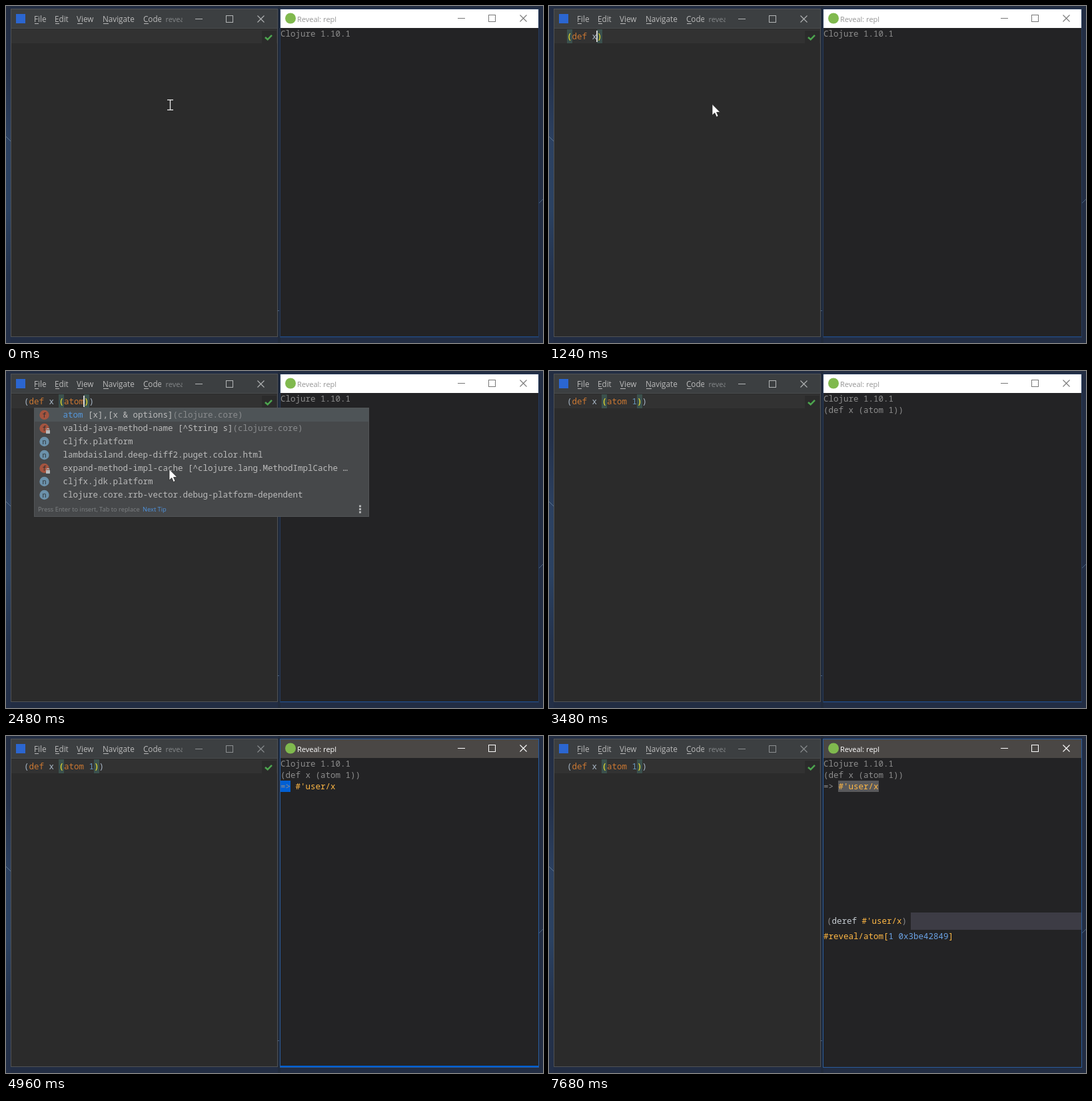
An HTML page with a canvas for the animation above (8 s loop, 806x506 px).

```html
<!DOCTYPE html>
<html lang="en">
<head>
<meta charset="utf-8">
<title>Editor and REPL</title>
<style>
html, body { margin: 0; width: 100%; height: 100%; overflow: hidden; background: #232e43; }
canvas { display: block; }
</style>
</head>
<body>
<canvas id="stage" width="806" height="506"></canvas>
<script>
const c = document.getElementById('stage').getContext('2d');
const LOOP = 8000, CW = 7.5;
const MONO = '"Noto Sans Mono", "DejaVu Sans Mono", monospace';
const UI = '"Open Sans", "Noto Sans", sans-serif';
const ORANGE = '#ffb845', GREY = '#8d8d8d', BLUE = '#005fd3', PANEL = '#3d3c45', DARK = '#232325';

const box = (x, y, w, h, col) => { c.fillStyle = col; c.fillRect(x, y, w, h); };
const frame = (x, y, w, h, col) => { c.strokeStyle = col; c.lineWidth = 1; c.strokeRect(x + .5, y + .5, w - 1, h - 1); };
const disc = (x, y, r, col) => { c.fillStyle = col; c.beginPath(); c.arc(x, y, r, 0, 7); c.fill(); };
const text = (s, x, y, col, size = 12.5, font = MONO) => {
  c.font = size + 'px ' + font;
  c.fillStyle = col;
  c.fillText(s, x, y);
};
const ui = (s, x, y, col, size = 11.2) => text(s, x, y, col, size, UI);
const line = (col, width, ...pts) => {
  c.strokeStyle = col; c.lineWidth = width; c.beginPath();
  for (let i = 0; i < pts.length; i += 2) c.lineTo(pts[i], pts[i + 1]);
  c.stroke();
};
const shape = (col, ...pts) => {
  c.fillStyle = col; c.beginPath();
  for (let i = 0; i < pts.length; i += 2) c.lineTo(pts[i], pts[i + 1]);
  c.closePath(); c.fill();
};
// [string, colour] runs on the character grid
const runs = (parts, x, y) => parts.forEach(([s, col]) => { text(s, x, y, col); x += s.length * CW; });
const rows = (s, x, y, step, col, size, font = UI) =>
  s.split('|').forEach((r, i) => text(r, x, y + i * step, col, size, font));
const clip = (x, y, w, h, draw) => {
  c.save(); c.beginPath(); c.rect(x, y, w, h); c.clip(); draw(); c.restore();
};
const shadowed = draw => {
  c.save(); c.shadowColor = 'rgba(0,0,0,.6)'; c.shadowBlur = 8; c.shadowOffsetY = 3; draw(); c.restore();
};

const KEYS = [[360, '('], [600, 'd'], [760, 'e'], [840, 'f'], [920, ' '], [1160, 'x'], [1640, ' '], [1840, '('],
  [2080, 'a'], [2240, 't'], [2320, 'o'], [2400, 'm'], [2640, ' '], [2800, '1']];
const QUERY = [[6520, 'd'], [6600, 'e'], [6840, 'r'], [6920, 'e']];
const ACTIONS = ['datafy', 'deref', 'doc', 'java-bean', 'meta', 'source', 'watch:all', 'watch:latest'];
const typed = (keys, t) => keys.filter(k => t >= k[0]).map(k => k[1]).join('');

// first letter: f function, F private function, n namespace
const DEF = ['fdef(clojure.core)', 'fdefn(clojure.core)', 'fdefn-(clojure.core)', 'fdefmulti(clojure.core)',
  'fdefmethod(clojure.core)', 'fdefmacro(clojure.core)', 'fdefonce(clojure.core)', 'fdefprotocol(clojure.core)',
  'fdefrecord(clojure.core)', 'fdeftype(clojure.core)', 'fdefstruct(clojure.core)', 'fdefinline(clojure.core)'];
const XS = ['fxml-seq [root](clojure.core)', 'nclojure.xml', 'fmax [x],[x y],[x y & more](clojure.core)',
  'fex-data [ex](clojure.core)', 'fex-info [msg map](clojure.core)', 'fnext [coll](clojure.core)',
  'fextend [atype & proto+mmaps](clojure.core)', 'findexed? [coll](clojure.core)', 'fex-cause [ex](clojure.core)',
  'fex-message [ex](clojure.core)', 'fnnext [x](clojure.core)', 'fexpt'];
const AS = ['fatom [x],[x & options](clojure.core)', 'fand [],[x],[x & next](clojure.core)',
  'fapply [f args],[f x args](clojure.core)', 'fassoc [map key val](clojure.core)',
  'fas-> [expr name & forms](clojure.core)', 'falter [ref fun & args](clojure.core)',
  'fagent [state & options](clojure.core)', 'faget [array idx](clojure.core)', 'falias [alias ns](clojure.core)',
  'fancestors [tag],[h tag](clojure.core)', 'faclone [array](clojure.core)', 'falength [array](clojure.core)'];
const ATOM = [AS[0], 'Fvalid-java-method-name [^String s](clojure.core)', 'ncljfx.platform',
  'nlambdaisland.deep-diff2.puget.color.html', 'Fexpand-method-impl-cache [^clojure.lang.MethodImplCache …',
  'ncljfx.jdk.platform', 'nclojure.core.rrb-vector.debug-platform-dependent'];
// from, to, index of the completed word, entries, height
const HINTS = [[680, 920, 1, DEF, 254], [1320, 1640, 5, XS, 254], [2160, 2480, 8, AS, 254], [2480, 2640, 8, ATOM, 164]];

function desktop() {
  const g = c.createLinearGradient(0, 0, 0, 506);
  ['#232d42', '#24314a', '#2c4161', '#2b4262', '#24334d', '#232f47'].forEach((col, i) => g.addColorStop(i / 5, col));
  box(0, 0, 806, 506, '#222d43');
  c.fillStyle = g; c.fillRect(0, 0, 7, 506);
  box(408, 0, 4, 506, '#202a3b');
  line('#5b7590', 1, 0, 196, 7, 203);
  line('#49617f', 1, 800, 296, 806, 290);
  box(408, 457, 2, 1, '#4a6384');
}

function controls(x, y, col) {
  line(col, 1, x - 5, y + .5, x + 6, y + .5);
  frame(x + 41, y - 5, 11, 11, col);
  line(col, 1.1, x + 88.5, y - 4.5, x + 98.5, y + 5.5);
  line(col, 1.1, x + 98.5, y - 4.5, x + 88.5, y + 5.5);
}

function editor(t, active) {
  box(7, 4, 401, 493, '#505254');
  box(8, 5, 399, 491, '#2b2b2b');
  box(8, 5, 399, 29, '#3c3f41');
  box(8, 33, 399, 1, '#494c4e');
  box(8, 35, 399, 21, '#323232');
  box(384, 37, 22, 19, '#2b2b2b');
  line('#4da54f', 2.6, 389, 47, 392.7, 50.3, 399, 43.8);
  box(15, 12, 14, 14, '#2b66d0');
  clip(8, 5, 225, 28, () => {
    const at = [42, 73, 106, 145, 206], under = [6, 6, 8, 8, 7];
    'File|Edit|View|Navigate|Code'.split('|').forEach((s, i) => {
      ui(s, at[i], 24, '#bbbbbb', 11.7);
      box(at[i] + 1, 26, under[i], 1, '#bbbbbb');
    });
  });
  clip(239, 5, 26, 28, () => ui('reveal', 239.5, 24, '#85888a', 11));
  controls(289, 19, active ? '#b4b6b7' : '#8c8f91');

  const head = typed(KEYS, t), opens = head.split('(').length - 1;
  const code = head + ')'.repeat(opens), open = head.lastIndexOf('(');
  const lit = i => opens && (i === open || i === head.length);
  let i = 0;
  for (const s of code.match(/[a-z]+|./g) || []) {
    const x = 27 + i * CW;
    if (lit(i)) box(Math.round(x - .5), 35, 8, 21, '#3b514d');
    const col = lit(i) ? '#ffef28' : /^(def|atom)$/.test(s) ? '#cc7832' : s === '1' ? '#6897bb' : '#a9b7c6';
    text(s, x, 50, col);
    i += s.length;
  }
  if (active && t >= 80 && t < 3480) box(Math.floor(27 + head.length * CW - .5), 37, 2, 17, '#d0d0d0');
}

function hints(t) {
  const now = HINTS.find(h => t >= h[0] && t < h[1]);
  if (!now) return;
  const [, , start, list, h] = now, x = 27 + start * CW - 45, prefix = typed(KEYS, t).slice(start);
  box(x, 55, 503, h, '#46484a');
  clip(x, 55, 503, h - 23, () => list.forEach((item, i) => {
    const y = 66 + i * 20, kind = item[0], cut = item.lastIndexOf('(');
    const body = cut < 0 ? item.slice(1) : item.slice(1, cut), tail = cut < 0 ? '' : item.slice(cut);
    if (!i) box(x, 55, 503, 21, '#4e5457');
    disc(x + 15.5, y, 7.2, kind === 'n' ? '#6b91ab' : '#a5543f');
    text(kind.toLowerCase(), x + 12.5, y + 3.5, '#2c3033', 10);
    if (kind === 'F') {
      box(x + 18, y + 3, 6, 5, '#b6b9bb');
      frame(x + 19, y, 4, 5, '#b6b9bb');
    }
    const n = body.startsWith(prefix) ? prefix.length : 0;
    runs([[body.slice(0, n), '#5598dc'], [body.slice(n), '#bbbbbb'], [tail, '#8a8c8e']], x + 43.5, y + 4);
  }));
  const y = 55 + h - 8.5;
  ui('Press Enter to insert, Tab to replace', x + 6, y, '#7f8284', 9.3);
  ui('Next Tip', x + 163, y, '#4f94e0', 9.3);
  for (let i = 0; i < 3; i++) box(x + 488, y - 9 + i * 4.5, 3, 3, '#b5b7b8');
  frame(x, 55, 503, h, '#525557');
}

function repl(t, focus) {
  box(411, 4, 389, 494, focus ? '#2a5c9c' : '#263a5a');
  box(412, 5, 387, 492, DARK);
  box(412, 5, 387, 28, focus ? '#4a4745' : '#ffffff');
  disc(427, 18.5, 8, '#80b94e');
  ui('Reveal: repl', 437, 23.5, focus ? '#ffffff' : '#969696', 11);
  controls(683, 18, focus ? '#ffffff' : '#777777');
  if (!focus) box(412, 496, 387, 1, '#1d4986');
  else if (t < 7680) box(412, 495, 387, 2, BLUE);

  if (focus) {
    if (t >= 5040) box(434, 67, 61, 17, t < 7680 ? BLUE : '#59595b');
    else if (t >= 4960) box(412, 67, 15, 17, BLUE);
    else if (t >= 4720) box(412, 50, 120, 17, BLUE);
    else if (t >= 4560) box(412, 33, 105, 17, BLUE);
  }
  text('Clojure 1.10.1', 412, 46, GREY);
  if (t >= 3480) text('(def x (atom 1))', 412, 63, GREY);
  if (t >= 3560) runs([['=> ', GREY], ["#'user/x", ORANGE]], 412, 80);
  if (t >= 7680) {
    box(543, 265, 256, 26, PANEL);
    runs([['(', GREY], ['deref ', '#c8ced4'], ["#'user/x", ORANGE], [')', GREY]], 417, 282);
    runs([['#reveal/atom[', ORANGE], ['1 0x3be42849', '#6ba3e6'], [']', ORANGE]], 412, 305);
  }
}

function actions(t) {
  if (t < 6200 || t >= 7520) return;
  const q = typed(QUERY, t), list = ACTIONS.filter(a => a.startsWith(q)), picked = t >= 7200;
  shadowed(() => box(314, 94, 299, 45 + list.length * 25, PANEL));
  shape(PANEL, 458, 94.5, 463.5, 84, 469, 94.5);
  box(319, 98, 289, 31, DARK);
  if (!picked) box(319, 127, 289, 2, BLUE);
  text(q, 326, 118, '#c8ced4');
  if (!picked) box(326 + Math.floor(q.length * CW), 105, 1, 17, '#ffffff');
  if (picked) box(319, 134, 289, 25, BLUE);
  list.forEach((a, i) => text(a, 325.5, 150 + i * 25, picked ? '#c8ced4' : '#8e8e93'));
}

function ibeam() {
  for (const [col, w] of [['#1c1c1c', 3], ['#e8e8e8', 1.4]]) {
    line(col, w, 246.5, 141, 246.5, 156);
    line(col, w, 242, 141, 251, 141);
    line(col, w, 242, 156, 251, 156);
  }
}
function arrow() {
  const pts = [245, 147.5, 245, 164, 248.8, 160.6, 251.4, 166.5, 254, 165.3, 251.5, 159.6, 256.8, 159.4];
  shape('#ffffff', ...pts);
  line('#222222', .7, ...pts, 245, 147.5);
}

function thumb(x, y, w, sx, sy, sw, sh, draw) {
  c.save();
  c.translate(x, y); c.scale(w / sw, w / sw); c.translate(-sx, -sy);
  clip(sx, sy, sw, sh, draw);
  c.restore();
}

function notes() {
  box(366, 104, 432, 232, '#2a2318');
  box(366, 104, 432, 13, '#241e15');
  ui('File  Edit  Selection  View  Go  Run', 372, 109, '#8a857d', 3.8);
  ui('reveal.md - writings (Workspace)', 555, 109, '#8a857d', 3.8);
  ui('watch.md      reveal.md  ×      notes.md', 436, 115.5, '#a49c8d', 4);
  ui('Preview reveal.md  ×', 650, 115.5, '#a49c8d', 4);
  box(366, 117, 11, 215, '#332a1c');
  for (let i = 0; i < 5; i++) frame(369, 120 + i * 10, 5, 5, '#8a8378');
  for (let i = 0; i < 2; i++) disc(371.5, 315 + i * 9, 2.3, '#8a8378');
  box(377, 117, 54, 215, '#30271a');
  const files = ['docs', 'drafts', '2019-12-14-notes.md', '2020-03-02-tips.md', 'demo.gif', 'index.md', 'images'];
  for (let i = 0; i < 41; i++)
    ui(files[i * 5 % 7], 381 + i * 3 % 4 * 2.2, 123 + i * 5, i % 6 === 2 ? '#c99a4b' : '#9c9384', 4);
  const mono = (s, x, y, col) => rows(s, x, y, 4.6, col, 3.6, MONO);
  for (let i = 0; i < 29; i++) text(String(102 + i), 437, 124 + i * 4.6, '#655e53', 3.3);
  mono('symbols, functions, keywords (if they define a spec, like [slurp](docs)). It|supports `{{definition}}` syntax in docstrings to refer to other vars, making|them accessible for further exploration.', 447, 124, '#b3a68f');
  mono('![Doc and source demo](/assets/reveal/doc-and-source.gif)', 447, 143, '#b69a5e');
  mono('## Ref watchers', 447, 151, '#e0a64b');
  mono('Reveal can watch any object implementing `clojure.lang.IRef` (things like atoms,|vars, refs) and display it either automatically updated or as a log of successors.', 447, 155.5, '#b3a68f');
  box(447, 164, 12, 5, '#a8823c');
  mono('# TODO', 447, 168, '#f0c468');
  const todo = '- features|  - context menu and builtin actions:|    - datafy/nav|    - deref/java bean|    - watchers|    - charts|    - table|  - performance|  - text search|  - deep diff|- usage|  - using the UI: shortcuts and stuff|  - customization: prefs|  - general information: reveal main api, tap|  - editor integration|    - socket repl, main repl, nrepl|- extensibility|  - custom formatting|  - custom actions';
  mono(todo, 447, 173, '#b3a68f');
  for (let i = 0; i < 42; i++) box(615, 119 + i * 2, 6 + i * 7 % 17, .8, i === 21 ? '#c99a4b' : '#6d6558');
  box(642, 117, 1, 215, '#3b3324');
  ui('supports definition syntax in docstrings to refer to other vars.', 654, 124, '#aaa293', 4);
  box(654, 131, 130, 81, '#23303f');
  box(655, 132, 64, 79, '#2b2b2b');
  box(720, 132, 63, 79, DARK);
  box(655, 132, 64, 5, '#45484b');
  box(720, 132, 63, 5, '#4a4745');
  box(722, 139, 24, 2, '#7b7b7b'); box(688, 153, 1, 5, '#dddddd');
  ui('Ref watchers', 654, 223.5, '#d6cebf', 6);
  rows('Reveal can watch any object implementing clojure.lang.IRef (atoms,|vars, refs) and display it either updated or as a log of successors.', 654, 233, 5.2, '#aaa293', 4);
  ui('TODO', 654, 249, '#d6cebf', 7);
  box(654, 252, 130, .6, '#5a5347');
  rows('• features|   ◦ context menu and builtin actions|       ▪ datafy/nav|       ▪ deref/java bean|       ▪ watchers|       ▪ charts|       ▪ table|   ◦ performance|   ◦ text search|   ◦ deep diff|• usage|   ◦ using the UI: shortcuts and stuff|   ◦ customization: prefs|   ◦ general information: main api, tap|   ◦ editor integration', 660, 262, 4.9, '#aaa293', 4);
  box(796, 250, 2, 40, '#5b5340');
  box(366, 332, 432, 4, '#211b12');
  box(366, 332, 8, 4, '#d07a35');
  ui('master*   ⊗ 0  ⚠ 0', 377, 335.3, '#948c7e', 3.5);
  ui('Ln 125, Col 7    Spaces: 2    UTF-8    CRLF    Markdown', 700, 335.3, '#948c7e', 3.5);
}

function dots(x, y) {
  for (let i = 0; i < 3; i++) box(x + i * 8, y - .5, 3, 1, '#a0a0a0');
}

function files() {
  box(0, 381, 229, 125, '#191919');
  dots(205, 384.5);
  box(0, 395, 229, 25, '#1e1e1e');
  for (const x of [2, 38, 68]) box(x, 398, 7, 9, x === 2 ? '#e8c564' : '#d7dbe0');
  rows('New|folder', 1, 412, 5, '#aaaaaa', 4.2);
  ui('Properties', 34, 412, '#aaaaaa', 4.2);
  rows('New item ▾|Easy access ▾', 12, 400, 6, '#bbbbbb', 4.2);
  rows('Open ▾|Edit|History', 48, 400, 6, '#bbbbbb', 4.2);
  rows('Select all|Select none|Invert selection', 78, 400, 6, '#bbbbbb', 4.2);
  frame(0, 422, 180, 8, '#303030'); frame(190, 422, 38, 8, '#303030');
  ui('Date modified', 8, 436, '#aaaaaa', 4.4);
  ui('Type', 52, 436, '#aaaaaa', 4.4);
  ui('Size', 88, 436, '#aaaaaa', 4.4);
  const kinds = ['File folder', 'HTML Document', 'PNG File', 'Application', 'Application', 'JPG File', 'GIF File', 'JAR File', 'Windows Installer Pa…'];
  for (let i = 0; i < 10; i++) {
    const y = 444 + i * 7.1, d = String(1 + i * 11 % 28).padStart(2, '0');
    ui(d + '/07/2020 ' + (10 + i * 5 % 13) + ':22', 8, y, '#a8a8a8', 4.4);
    ui(kinds[i % 9], 52, y, '#a8a8a8', 4.4);
    if (i) ui((i * 397 % 990 + 8) + ' KB', 92, y, '#a8a8a8', 4.4);
  }
}

function chat() {
  box(242, 381, 212, 125, '#17130d');
  box(242, 381, 73, 125, '#261f14');
  box(242, 381, 212, 6, '#30281a');
  dots(432, 384);
  box(254, 389, 58, 7, '#3a3021'); ui('Search', 257, 394.5, '#8d8068', 4.3);
  for (let i = 0; i < 3; i++) box(245, 390 + i * 2, 5, .8, '#9c8f76');
  const names = ['Woolen', 'public tea', 'Morblooper', 'Ferret Chat', 'Заметки', 'Саджон', 'Разноцветный Список', 'Тихая Волна'];
  names.forEach((s, i) => {
    const y = 399 + i * 14;
    if (i === 2) box(242, y - 1, 73, 14, '#71541f');
    disc(249.5, y + 6, 5, `hsl(${i * 77 + 20},45%,52%)`);
    ui(s, 257, y + 5, '#ded3bf', 4.6);
    ui(i % 2 ? 'Photo, 2 messages' : 'Да, хорошо', 257, y + 11, '#a08d68', 4.2);
    ui('2' + i % 3 + ':1' + i, 303, y + 5, '#8d8068', 3.8);
  });
  box(316, 387, 138, 10, '#261f14');
  ui('Morblooper', 319, 391.5, '#ded3bf', 4.6);
  ui('last seen recently', 319, 396, '#948567', 3.8);
  clip(319, 397, 73, 41, () => {
    box(319, 397, 73, 41, '#6a4c38');
    box(319, 397, 20, 41, '#a18d7b');
    c.fillStyle = '#ded8d0'; c.beginPath(); c.ellipse(354, 416, 29, 19, 0, 0, 7); c.fill();
    c.fillStyle = '#b87b32'; c.beginPath(); c.ellipse(352, 416, 20, 12, 0, 0, 7); c.fill();
    disc(346, 413, 5, '#d9a34d'); disc(360, 418, 4, '#7e9043');
  });
  box(319, 438, 73, 7, '#30271a');
  ui('Только летнее отлично живёт', 321, 443.5, '#d8ccb5', 4.2);
  box(425, 446, 27, 7, '#725625'); ui('ого  21:20', 428, 451.5, '#eadfc9', 4.2);
  box(425, 455, 27, 6, '#725625'); ui('да!  21:21', 428, 460, '#eadfc9', 4.2);
  box(320, 463, 55, 7, '#30271a'); ui('Ладно, но мне, пожалуй', 322, 468.5, '#d8ccb5', 4.2);
  box(320, 472, 84, 12, '#30271a');
  rows('Хочу посмотреть переписанное, вдруг|есть на завтра', 322, 477, 5, '#d8ccb5', 4.2);
  box(427, 487, 25, 6, '#725625'); ui('ок  21:24', 430, 492, '#eadfc9', 4.2);
  ui('August 17', 375, 500, '#d8ccb5', 4.5);
}

function forum() {
  box(467, 381, 219, 125, '#16191e');
  box(467, 381, 219, 8, '#121418');
  box(541, 382.5, 92, 5, '#2a2f36'); ui('Search lispenfolk', 545, 386.6, '#9aa0a6', 3.8);
  dots(664, 385);
  box(467, 389, 13, 117, '#1c1e22'); box(480, 389, 51, 117, '#24272b');
  box(469, 392, 9, 9, '#d6e0d0');
  for (let i = 0; i < 2; i++) box(469, 406 + i * 13, 9, 9, i ? '#39485b' : '#4f7a8d');
  ui('lispenfolk ▾', 484, 396.5, '#ffffff', 5); disc(524, 396, 3.5, '#e7ecef');
  rows('All unreads|Threads|Mentions & reactions|Show more', 489, 411, 6.6, '#a9b4c0', 4.4);
  rows('▾  Starred|    # repl|    # tools', 485, 442, 6.6, '#8c99a8', 4.4);
  rows('▾  Channels|# announcements|# beginners|# cljfx|# editors', 485, 471, 6.7, '#a9b4c0', 4.4);
  box(480, 499, 51, 6, '#1d9bd1'); ui('# parens-shape', 485, 503.5, '#ffffff', 4.4);
  ui('#parens-shape', 536, 396, '#ffffff', 4.8);
  ui('☆ 2,104 members  |  about shapes of data', 536, 401, '#868b91', 3.8);
  disc(677, 396, 2.4, '#868b91');
  box(553, 403, 75, 7, '#25282c'); ui('(shape/check ::any-form value)', 556, 408.3, '#b5b9bd', 4);
  box(531, 407, 22, .5, '#40444a'); box(628, 407, 58, .5, '#40444a');
  const says = ['oltrenby|yep', 'jolvanter|Are you that', 'skimbrel|Well, it always stays by symbols so those are just keys', 'oltrenby|what? think it, docs, and metrics'];
  says.forEach((s, i) => say(s, 422 + i * 8));
  ui('Today ▾', 602, 459, '#d5d7d9', 4.4);
  box(531, 457.5, 66, .5, '#40444a'); box(622, 457.5, 64, .5, '#40444a');
  say('jolvanter|Anyone know whether shapes can be followed by SHAPE?', 467);
  ui('the docs say something like forms', 553, 472, '#4d9bd3', 4.2);
  for (let i = 0; i < 2; i++) disc(556 + i * 9, 476.5, 2, '#e3b341');
  say('skimbrel|while I think it\'s usually a bad idea to use this, it is unclear of', 486);
  rows('so far as I know, and the default works there|anyway too.', 553, 491, 5, '#b9bcbf', 4.2);
  say('oltrenby|from a quick skim of the docs, both hold for maps and sets', 502);
}
function say(s, y) {
  const [who, what] = s.split('|');
  ui('10:2' + y % 10, 541, y, '#777c82', 3.6);
  ui(who, 553, y, '#e05f7c', 4.4);
  ui(what, 575, y, '#b9bcbf', 4.2);
}

function switcher(t) {
  c.save();
  c.globalAlpha = t < 3960 ? .6 : 1;
  box(0, 46, 806, 460, 'rgba(20,20,20,.84)');
  thumb(-32, 103, 190, 7, 4, 401, 492, () => editor(t, false));
  thumb(170, 103, 183, 412, 5, 387, 491, () => repl(t, false));
  notes(); files(); chat();
  clip(467, 381, 219, 125, forum);
  frame(774, 418, 40, 100, '#2a2a2c');
  disc(182.5, 87, 12, '#80b94e');
  box(366, 75, 24, 24, '#2489ca');
  disc(253.5, 365, 11.3, '#2ca5e0');
  disc(478.5, 365, 11.5, '#ffffff');
  box(699, 355, 20, 20, '#e2e2e2');
  const title = (s, x, y) => ui(s, x, y, '#ffffff', 11.3);
  title('reveal – whatever.clj', -4, 92);
  title('Reveal: repl', 199, 92);
  title('reveal.md - writings (Workspace) - Amber Draught Desk', 395, 92);
  title('Pigeonry', 270, 370);
  title('Chirm | parens-shape | lispenfolk', 495, 370);
  title('GrabbedLoop', 726, 370);
  c.restore();
}

function pointer(t) {
  const within = (a, b) => t >= a && t < b;
  if (within(0, 360) || within(920, 1160) || within(1640, 1840) || within(2640, 2800)) ibeam();
  if (within(680, 920) || within(1240, 1640) || within(2160, 2640) || within(3880, 4040)) arrow();
}

function draw(now) {
  const t = now % LOOP, focus = t >= 4040;
  desktop();
  editor(t, !focus);
  repl(t, focus);
  hints(t);
  actions(t);
  if (t >= 3880 && t < 4040) switcher(t);
  pointer(t);
}

const start = performance.now();
function tick() {
  draw(performance.now() - start);
  requestAnimationFrame(tick);
}
tick();
</script>
</body>
</html>
```
